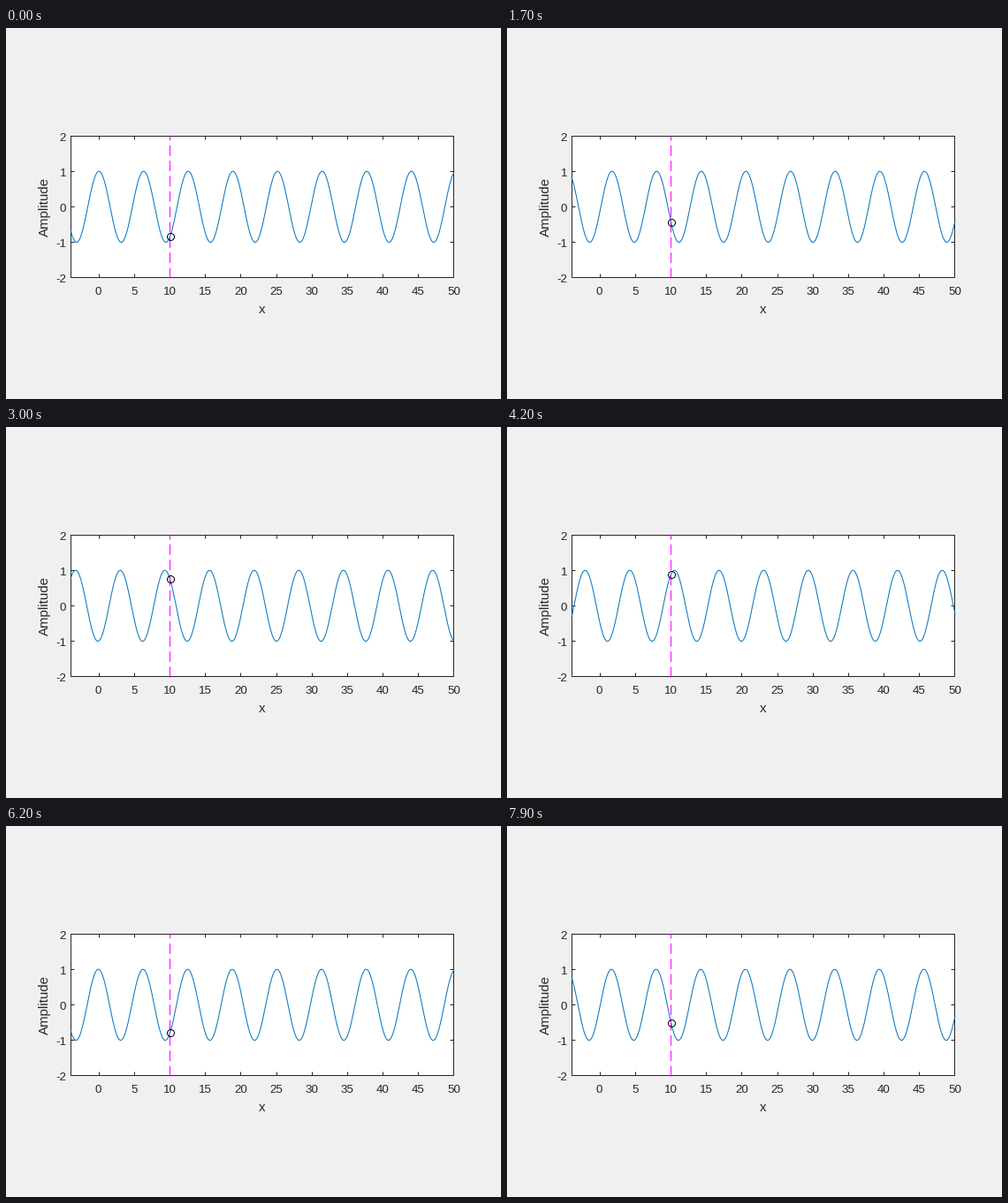
A matplotlib script that plays this animation: 560x420 px, repeating every 8 s.

```python
import numpy as np
import matplotlib.pyplot as plt
from matplotlib.animation import FuncAnimation
from matplotlib.patches import Rectangle

W, H, DPI = 560, 420, 100
FRAMES, INTERVAL = 80, 100
PT = 72 / DPI  # points per pixel

# Whole pixels: straight lines snap to the centre of the pixel named here
LEFT, RIGHT, TOP, BOTTOM = 73, 506, 122, 282
X_UNIT, Y_UNIT = 434 / 54, 434 / 54 * 5
PROBE = 10
INK = "#262626"
BLUE = "#0072BD"
MAGENTA = "#FF00FF"

plt.rcParams["font.family"] = "Liberation Sans"
fig = plt.figure(figsize=(W / DPI, H / DPI), dpi=DPI, facecolor="#F0F0F0")
ax = fig.add_axes([0, 0, 1, 1])
ax.set_xlim(0, W)
ax.set_ylim(H, 0)
ax.axis("off")


def px(x):
    return 73 + (x + 4) * X_UNIT


def py(y):
    return 202.4 - y * Y_UNIT


def line(xs, ys, color=INK, width=1, **kw):
    kw.setdefault("solid_capstyle", "butt")
    return ax.plot(xs, ys, color=color, lw=width * PT, **kw)[0]


def label(x, y, text, size, ha="center", **kw):
    ax.text(x, y, text, fontsize=size * PT, color=INK, ha=ha, va="baseline", **kw)


# Axes box, ticks and labels
ax.add_patch(Rectangle((LEFT, TOP), RIGHT - LEFT, BOTTOM - TOP, fc="white", ec="none"))
line([LEFT, RIGHT, RIGHT, LEFT, LEFT], [TOP, TOP, BOTTOM, BOTTOM, TOP],
     solid_capstyle="projecting", solid_joinstyle="miter")

TICK = 4
for v in range(0, 51, 5):
    x = min(int(px(v)), RIGHT)
    line([x, x], [TOP, TOP + TICK])
    line([x, x], [BOTTOM, BOTTOM - TICK])
    label(px(v) - 0.5, 302, str(v), 13.33)

for v in range(-2, 3):
    y = min(int(py(v)), BOTTOM)
    line([LEFT, LEFT + TICK], [y, y])
    line([RIGHT, RIGHT - TICK], [y, y])
    label(68, py(v) + 5.5, str(v), 13.33, ha="right")

label(290, 323, "x", 15)
label(48, 202, "Amplitude", 15, rotation=90, rotation_mode="anchor")

# Travelling wave with a probe at a fixed position
xs = np.arange(-40, 501) / 10
wave = line(px(xs), py(np.cos(xs)), BLUE, solid_joinstyle="round")
probe_x = int(px(PROBE))
line([probe_x, probe_x], [BOTTOM + 1, TOP], MAGENTA,
     dashes=(12, 5.33), dash_capstyle="butt")
dot = line([px(PROBE)], [py(0)], "black", marker="o", ms=8 * PT,
           mfc="none", mec="black", mew=PT)


def update(i):
    t = i * INTERVAL / 1000
    wave.set_ydata(py(np.cos(xs - t)))
    dot.set_ydata([py(np.cos(PROBE - t))])
    return wave, dot


anim = FuncAnimation(fig, update, frames=FRAMES, interval=INTERVAL, repeat=True)
plt.show()
```
